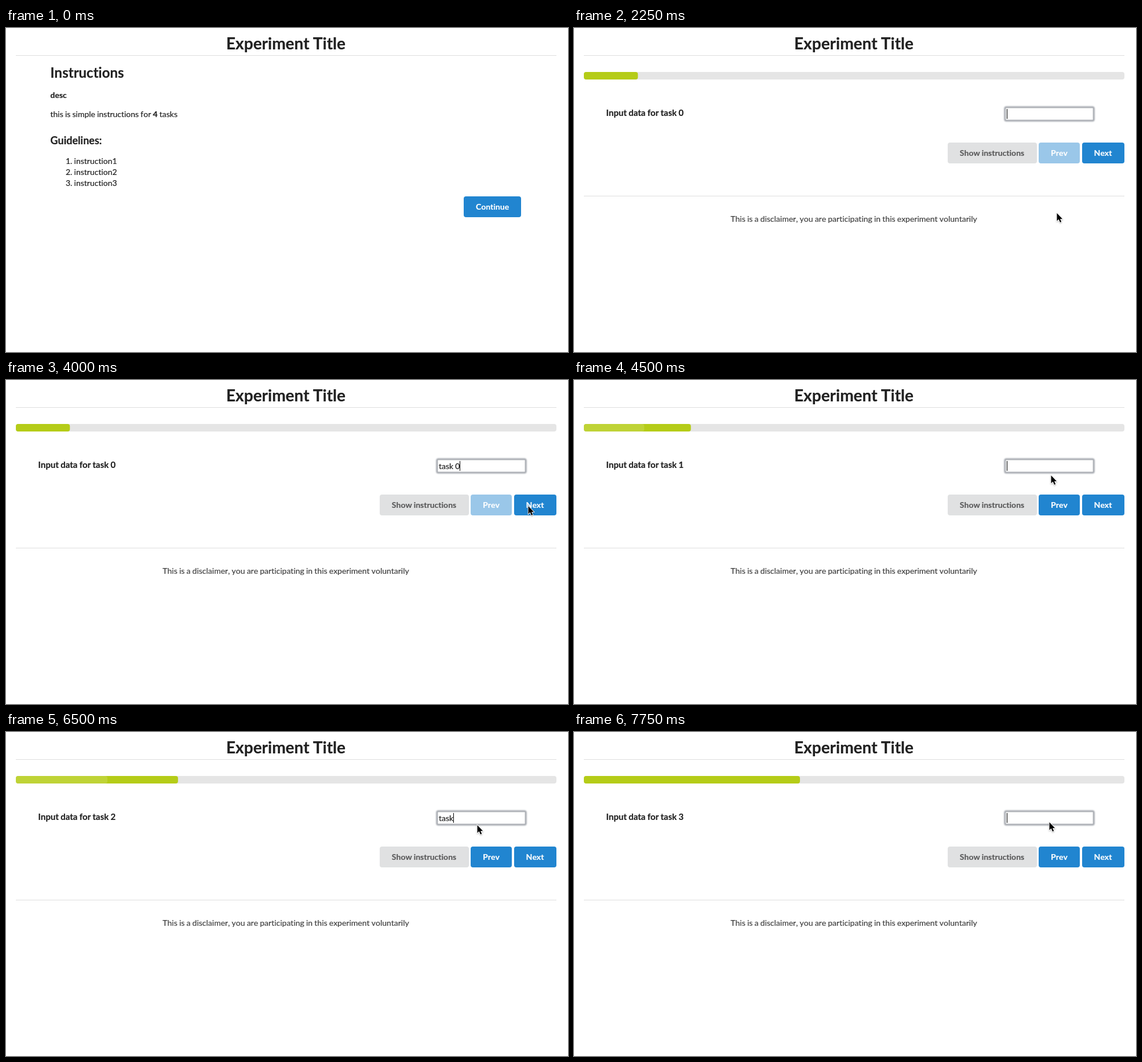
These frames come from a looping animation (970 px wide and 560 px high, 8 s). An HTML page:

```html
<!DOCTYPE html>
<html lang="en">
<head>
<meta charset="utf-8">
<title>Experiment Title</title>
<style>
  html, body { margin: 0; width: 100%; height: 100%; overflow: hidden; background: #fff; }
  svg { display: block; }
  text {
    font: 14px Lato, sans-serif; font-kerning: none; font-variant-ligatures: none;
    word-spacing: -.03em; white-space: pre;
    color: #212121; fill: currentColor; stroke: currentColor; stroke-width: .2;
  }
  .b { font-weight: 700; }
  .mid { text-anchor: middle; }
  .btn text { font-weight: 700; text-anchor: middle; color: #fff; }
  .btn rect { fill: #2185d0; }
  .btn.hover rect { fill: #1678c2; }
  .btn.off { opacity: .45; }
  .btn.grey rect { fill: #e0e1e2; }
  .btn.grey text { color: #5a5a5b; }
  .rule { fill: #dedede; }
</style>
</head>
<body>
<svg width="970" height="560" viewBox="0 0 970 560">
  <defs>
    <filter id="blur" x="-20%" y="-40%" width="140%" height="180%"><feGaussianBlur stdDeviation=".8"/></filter>
    <filter id="drop" x="-50%" y="-50%" width="200%" height="200%">
      <feDropShadow dx="0" dy="1" stdDeviation=".9" flood-opacity=".35"/>
    </filter>
  </defs>

  <text class="b mid" x="483" y="37" style="font-size:28px">Experiment Title</text>
  <rect class="rule" x="17" y="47" width="933" height="1"/>

  <g id="intro">
    <text class="b" x="76.5" y="86" style="font-size:24px">Instructions</text>
    <text class="b" x="76.5" y="121">desc</text>
    <text x="76.5" y="154">this is simple instructions for <tspan class="b">4</tspan> tasks</text>
    <text class="b" x="76.5" y="201" style="font-size:18px">Guidelines:</text>
    <text x="103" y="235">1. instruction1</text>
    <text x="103" y="254">2. instruction2</text>
    <text x="103" y="273">3. instruction3</text>
    <g class="btn" id="cont">
      <rect x="790" y="291" width="99" height="36" rx="4"/><text x="839.5" y="314">Continue</text>
    </g>
  </g>

  <g id="task">
    <rect x="17" y="76" width="933" height="13" rx="4" fill="#e5e5e5"/>
    <rect id="bar" x="17" y="76" height="13" rx="4" fill="#b5cc18"/>
    <rect id="shine" x="17" y="76" height="13" rx="4" fill="#fff"/>
    <text class="b" id="label" x="55.5" y="152" style="font-size:15px"></text>
    <rect x="744" y="137" width="153" height="23" rx="2" fill="none" stroke="#9a9ea5" stroke-width="3" filter="url(#blur)"/>
    <rect x="745" y="138" width="151" height="21" fill="#fff" stroke="#b0b3b8"/>
    <text id="typed" x="747" y="154"></text>
    <rect id="caret" y="140" width="1" height="17"/>
    <g class="btn grey">
      <rect x="645" y="198" width="154" height="36" rx="4"/><text x="721.5" y="221">Show instructions</text>
    </g>
    <g class="btn" id="prev">
      <rect x="802" y="198" width="71" height="36" rx="4"/><text x="837.5" y="221">Prev</text>
    </g>
    <g class="btn" id="next">
      <rect x="877" y="198" width="73" height="36" rx="4"/><text x="913" y="221">Next</text>
    </g>
    <rect class="rule" x="17" y="290" width="933" height="1"/>
    <text class="mid" x="483" y="335" style="color:#404040">This is a disclaimer, you are participating in this experiment voluntarily</text>
  </g>

  <path id="mouse" d="M.5 1V14.5L3.6 11.6 6 17 8.2 16 6 10.9H10Z" stroke="#fff" stroke-width="1.6"
        paint-order="stroke" filter="url(#drop)"/>
</svg>
<script>
const $ = id => document.getElementById(id);
const LOOP = 8000, STEP = 250, FULL = 933;
const APPEAR = 500, ON_CONTINUE = 1750, TASK_PAGE = 2250, FIRST_TASK = 2750, TASK_TIME = 1500;

const entry = [796, 181], continueAt = [833, 319], nextAt = [901, 217];
const rest = [[822, 277], [823, 164], [813, 160], [820, 155]]; // pointer while typing, per task

const clamp = v => Math.min(1, Math.max(0, v));
const mix = (a, b, fx, fy = fx) => [a[0] + (b[0] - a[0]) * fx, a[1] + (b[1] - a[1]) * fy];

function taskAt(t) {
  const n = Math.max(0, Math.floor((t - FIRST_TASK) / TASK_TIME));
  return { n, age: t - FIRST_TASK - n * TASK_TIME };
}

function pointer(t) {
  if (t < TASK_PAGE) {
    const u = clamp((t - APPEAR) / (ON_CONTINUE - APPEAR));
    return mix(entry, continueAt, u, 1 - (1 - u) ** 2.5);
  }
  const { n, age } = taskAt(t);
  if (age < 0) return mix(rest[0], continueAt, -age / (FIRST_TASK - TASK_PAGE));
  const leaving = n ? 1 - age / STEP : 0;
  const going = (age - 1000) / STEP;
  return mix(rest[n], nextAt, clamp(Math.max(leaving, going)));
}

function drawTask(t) {
  const { n, age } = taskAt(t);

  // the bar gains a tenth per task and settles quickly
  const lag = n ? .2 * .1 ** (age / STEP) : 0;
  const width = FULL * (n + 1 - lag) / 10;
  const sweep = 1 - 2 ** (-10 * ((t + 1740) % 2000) / 2000);
  $('bar').setAttribute('width', width);
  $('shine').setAttribute('width', width * sweep);
  $('shine').setAttribute('opacity', .3 * (1 - sweep));

  const chars = Math.max(0, 4 * (age - 500) / STEP);
  $('label').textContent = 'Input data for task ' + n;
  $('typed').textContent = ('task ' + n).slice(0, chars);
  $('caret').setAttribute('x', 747 + Math.round(chars && $('typed').getComputedTextLength()));
  $('prev').classList.toggle('off', n === 0);
  $('next').classList.toggle('hover', n > 0 && age < STEP);
}

function show(id, on) {
  $(id).style.display = on ? '' : 'none';
}

function draw(now) {
  const t = Math.floor(now % LOOP / STEP) * STEP;
  const onTask = t >= TASK_PAGE;
  show('intro', !onTask);
  show('task', onTask);
  show('mouse', t >= APPEAR);
  $('mouse').setAttribute('transform', `translate(${pointer(t)})`);
  $('cont').classList.toggle('hover', t >= ON_CONTINUE);
  if (onTask) drawTask(t);
}

const begin = performance.now();
function tick() {
  draw(performance.now() - begin);
  requestAnimationFrame(tick);
}
tick();
</script>
</body>
</html>
```
